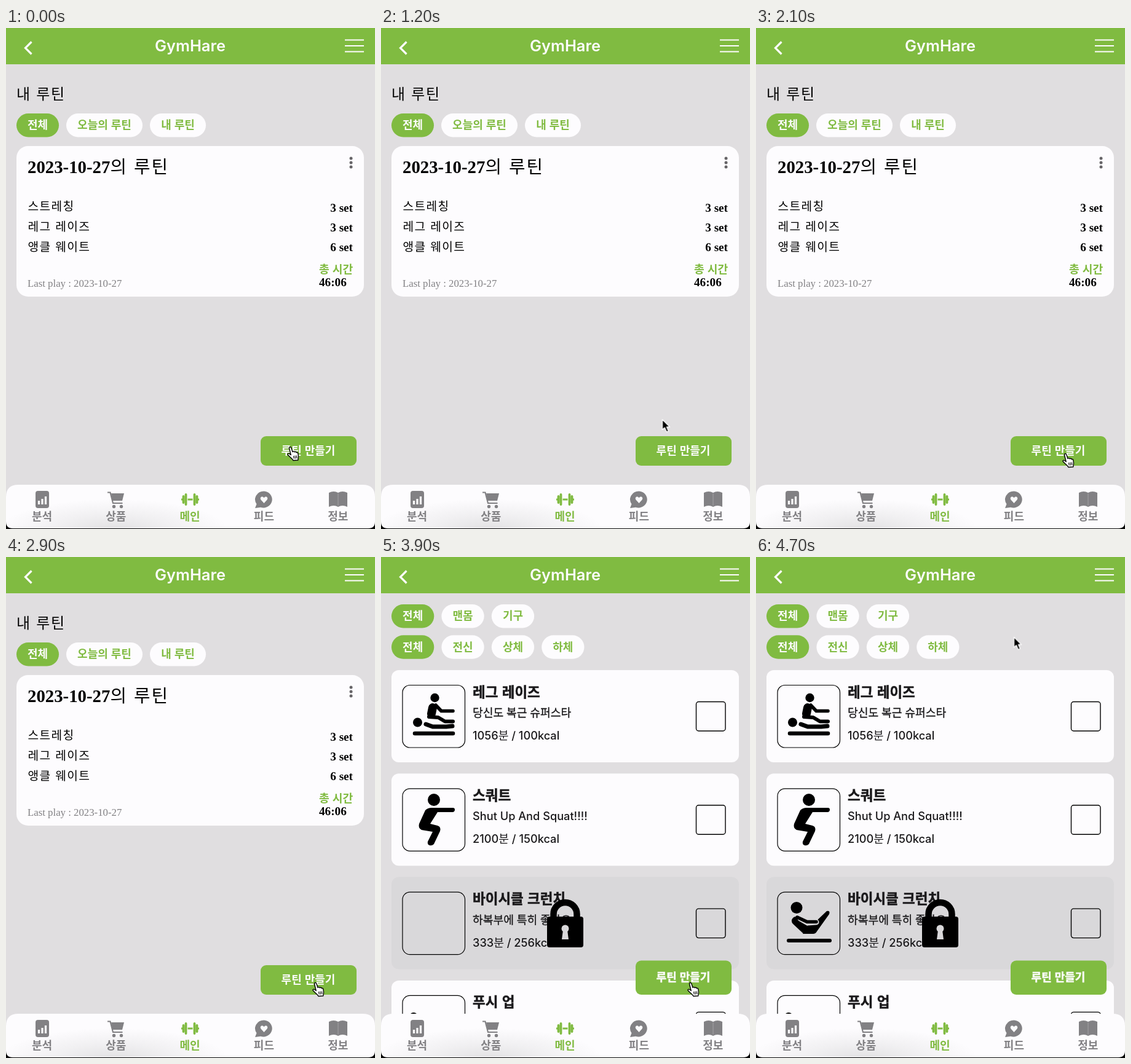
These frames come from a looping animation (600 by 815 pixels, 5000 ms). An HTML page:

```html
<!DOCTYPE html>
<html lang="ko">
<head>
<meta charset="utf-8">
<title>GymHare</title>
<style>
  :root { --green: #80bb41; --white: #fdfcfe; --gray: #828184; }
  html, body { margin: 0; width: 100%; height: 100%; overflow: hidden; background: #e0dee0; }
  svg { display: block; width: 100vw; height: 100vh; }
  text { font: 500 18.2px Inter, 'Noto Sans CJK KR', 'Noto Sans CJK', sans-serif; fill: #1a191b; }
  .kr { font: 700 18px 'Noto Sans CJK KR', 'Noto Sans CJK', sans-serif; }
  .serif { font: 400 19.2px 'Liberation Serif', 'Noto Sans CJK KR', 'Noto Sans CJK', serif; fill: #000; }
  .han { font-family: 'Noto Sans CJK KR', 'Noto Sans CJK', serif; font-weight: 300; letter-spacing: .07em; }
  .bold { font-weight: 700; }
  .mid { text-anchor: middle; }
  .end { text-anchor: end; }
  .green { fill: var(--green); }
  .white { fill: var(--white); }
  .gray { fill: var(--gray); }
  .line { fill: none; stroke: #000; stroke-linecap: round; stroke-linejoin: round; }
  .heavy { stroke: #1a191b; stroke-width: .5; }
  .medium { stroke: #1a191b; stroke-width: .3; }

  #home, #picker, #thumb, #cursor, #hand, #arrow { animation: 5s step-end infinite; }
  #home { animation-name: leave; }
  #picker { animation-name: enter; }
  #thumb { animation-name: load; }
  #cursor { animation-name: move; }
  #hand { animation-name: hand; }
  #arrow { animation-name: arrow; }
  @keyframes leave { 0% { visibility: visible } 78%, 100% { visibility: hidden } }
  @keyframes enter { 0% { visibility: hidden } 78%, 100% { visibility: visible } }
  @keyframes load { 0% { opacity: 0 } 80%, 100% { opacity: 1 } }
  @keyframes hand { 0% { opacity: 1 } 8% { opacity: 0 } 30% { opacity: 1 } 84%, 100% { opacity: 0 } }
  @keyframes arrow { 0% { opacity: 0 } 8% { opacity: 1 } 30% { opacity: 0 } 84%, 100% { opacity: 1 } }
  @keyframes move {
    0%  { transform: translate(462px, 682px) }
    6%  { transform: translate(461px, 668px) }
    8%  { transform: translate(459px, 648px) }
    10% { transform: translate(458px, 640px) }
    12% { transform: translate(457.5px, 637px) }
    28% { transform: translate(466px, 648px) }
    30% { transform: translate(484px, 671px) }
    32% { transform: translate(498px, 687px) }
    34% { transform: translate(503px, 693px) }
    84% { transform: translate(478px, 622px) }
    86% { transform: translate(437px, 501px) }
    92% { transform: translate(357px, 305px) }
    94%, 100% { transform: translate(419.5px, 130.5px) }
  }
</style>
</head>
<body>
<svg viewBox="0 0 600 815" preserveAspectRatio="none">
  <defs>
    <radialGradient id="shade">
      <stop offset="0" stop-color="#777" stop-opacity=".2"/>
      <stop offset=".5" stop-color="#777" stop-opacity=".09"/>
      <stop offset="1" stop-color="#777" stop-opacity="0"/>
    </radialGradient>
    <clipPath id="bar"><path d="M0 763Q0 743 20 743H580Q600 743 600 763V803Q600 814 589 814H11Q0 814 0 803Z"/></clipPath>
  </defs>
  <rect width="600" height="815" fill="#e0dee0"/>

  <g id="home">
    <text class="serif" x="17" y="116"><tspan class="han" style="font-size:24px">내 루틴</tspan></text>
    <g id="filters"></g>
    <rect class="white" x="17" y="192" width="565" height="245" rx="19"/>
    <text class="serif bold" x="35" y="235.5" style="font-size:28.8px">2023-10-27<tspan class="han" style="font-weight:400">의 루틴</tspan></text>
    <g fill="#666467">
      <circle cx="561" cy="212" r="2.5"/><circle cx="561" cy="219" r="2.5"/><circle cx="561" cy="226" r="2.5"/>
    </g>
    <g id="sets"></g>
    <text class="kr green" x="509" y="399" style="font-size:18.2px">총 시간</text>
    <text class="serif bold" x="509" y="420">46:06</text>
    <text class="serif" x="35" y="421" style="font-size:16.8px;fill:#828184">Last play : 2023-10-27</text>
    <rect class="green" x="414" y="664" width="156" height="48" rx="9"/>
    <text class="kr mid white" x="491.5" y="693.5">루틴 만들기</text>
  </g>

  <g id="picker">
    <g id="chips"></g>
    <g id="cards"></g>
    <g>
      <circle cx="87.5" cy="229" r="7.2"/>
      <circle cx="59.5" cy="269" r="7.5"/>
      <g class="line">
        <path d="M84 245L82 255" stroke-width="14"/>
        <path d="M89 241L98 250.500H117" stroke-width="5.5"/>
        <path d="M78 260L93 261L104 267.500H117" stroke-width="6"/>
        <path d="M73 272L84 276H106L116 275" stroke-width="7"/>
        <path d="M55 287H117" stroke-width="6.5"/>
      </g>
    </g>
    <g>
      <circle cx="86" cy="395" r="10"/>
      <path d="M72 412Q76 408 82 408H117Q120 408 120 411T117 415H92L80 434L92 437Q98 439 96 446L86 467Q83 470 79 469T76 463L84 447L66 444Q60 441 62 434Z"/>
    </g>
    <g id="thumb">
      <circle cx="66" cy="570.5" r="9.5"/>
      <path d="M76 613H93Q97 613 99 609L119 581Q121 575 115 576L94 596L84 599Z"/>
      <g class="line">
        <path d="M65 592L80 606" stroke-width="14"/>
        <path d="M72 588L84 595L98 594" stroke-width="9" style="stroke:#d9d8da"/>
        <path d="M67 586L83 593.500H98" stroke-width="5.500"/>
        <path d="M53 624H120" stroke-width="6"/>
      </g>
    </g>
    <circle cx="53" cy="748" r="7"/>
    <path d="M280.500 588V581A19 19 0 0 1 318.500 581V588" fill="none" stroke="#000" stroke-width="10.500"/>
    <rect x="270" y="585" width="59" height="50" rx="4"/>
    <path d="M296 607L294 622H305L303 607Z" fill="#d9d8da"/>
    <circle cx="299.500" cy="604.500" r="6" fill="#d9d8da"/>
    <rect class="green" x="414" y="656.500" width="156" height="55.500" rx="9"/>
    <text class="kr mid white" x="491.5" y="690" stroke="#fdfcfe" stroke-width=".5">루틴 만들기</text>
  </g>

  <rect class="green" width="600" height="59"/>
  <text class="mid" x="299.500" y="38" style="font-size:25.4px;font-weight:600;fill:#fdfcfe">GymHare</text>
  <path d="M41.500 22.500L31.500 32.500L41.500 42.500" fill="none" stroke="#fdfcfe" stroke-width="3.200"/>
  <path d="M551 19.500H582M551 29H582M551 38.500H582" fill="none" stroke="#fdfcfe" stroke-width="2"/>

  <path d="M0 800H600V815H0Z" fill="#080808"/>
  <g clip-path="url(#bar)">
    <rect class="white" y="743" width="600" height="71"/>
    <ellipse cx="175" cy="816" rx="185" ry="50" fill="url(#shade)"/>
  </g>
  <g class="gray">
    <rect x="48" y="753" width="22" height="28" rx="4"/>
    <path d="M53.500 775V769M59 775V766M64.500 775V762" stroke="#fdfcfe" stroke-width="3.200"/>
    <path d="M171 757H192L189 769H173Z"/>
    <path d="M165 755.500H169.500L174 773H189.500" fill="none" stroke="#828184" stroke-width="2.200"/>
    <circle cx="175.500" cy="778.500" r="2.700"/><circle cx="187.500" cy="778.500" r="2.700"/>
    <path d="M419.500 753.500A14.300 13.500 0 1 1 414 779.800L405 781L407.500 774.500A14.300 13.500 0 0 1 419.500 753.500Z"/>
    <path class="white" d="M419.500 773L414.500 767.500C411.800 763.500 417 760.500 419.500 764.500C422 760.500 427.200 763.500 424.500 767.500Z"/>
    <path d="M525 756Q533 752 540 756Q547 752 555 756V779Q547 775 540 779Q533 775 525 779Z"/>
    <path d="M540 757V777" stroke="#a3a2a5" stroke-width="1"/>
  </g>
  <path d="M292.500 759V775M306.500 759V775M288.500 762V772M310.500 762V772" stroke="#80bb41" stroke-width="3.800" stroke-linecap="round"/>
  <path d="M285 767H288M295.500 767H303.500M311 767H314" stroke="#80bb41" stroke-width="3"/>
  <g id="tabs"></g>

  <g id="cursor">
    <g id="hand" stroke="#000" stroke-width="1.400" stroke-linejoin="round">
      <path fill="#fff" d="M-1.500 1.500C-1.800-.8 1-1.200 1.800 1L4 7.500C4.800 6.200 6.600 6.400 7 7.800C8 6.800 9.600 7.200 10 8.600C11 8 12.500 8.500 12.800 10L13.500 14.500C13.600 17 12.800 18 12.800 21L5 21.500C4 19-1 15.500-3.500 12.500C-4.800 10.800-3 9.500-1.500 10.500L1.200 12.500Z"/>
      <path fill="none" stroke-width="1.100" d="M5.500 14L6.200 18.500M8 13.500L8.500 18.500M10.500 13.500L10.800 18"/>
    </g>
    <path id="arrow" d="M0 0V16.500L3.800 13.100L6.900 20L9.900 18.700L7 12H12Z" fill="#000" stroke="#fff" stroke-width="1.300" stroke-linejoin="round"/>
  </g>
</svg>
<script>
  const put = (id, html) => document.getElementById(id).innerHTML = html;
  const text = (x, y, cls, s, style = '') => `<text x="${x}" y="${y}" class="${cls}" style="${style}">${s}</text>`;

  const pill = (x, y, w, label, on) =>
    `<rect x="${x}" y="${y}" width="${w}" height="38.5" rx="19.25" class="${on ? 'green' : 'white'}"/>` +
    text(x + w / 2, y + 25.3, 'kr mid ' + (on ? 'white' : 'green'), label);

  const chipRow = (y, labels) => labels.map((s, i) => pill(17 + i * 81.4, y, 69.3, s, !i)).join('');

  const card = ([title, note, info], i) => {
    const y = 184 + i * 168.3;
    const fill = i === 2 ? '#d9d8da' : '#fdfcfe';
    return `<rect x="17" y="${y}" width="565" height="150" rx="12" fill="${fill}"/>` +
      `<rect x="35" y="${y + 24.5}" width="101.5" height="101.5" rx="12" class="line" stroke-width="1.2"/>` +
      `<rect x="512.5" y="${y + 51.5}" width="47.5" height="47.5" rx="4" class="line" stroke-width="1.4"/>` +
      text(149, y + 43.5, 'kr heavy', title, 'font-size:22.5px') +
      text(149, y + 76, /[가-힣]/.test(note) ? 'medium' : '', note) +
      text(149, y + 113, '', info);
  };

  put('filters', pill(17, 139, 69, '전체', true) + pill(98, 139, 124, '오늘의 루틴') + pill(234, 139, 91, '내 루틴'));
  put('sets', [['스트레칭', 3], ['레그 레이즈', 3], ['앵클 웨이트', 6]].map(([name, n], i) =>
    text(35.5, 297 + i * 33, 'serif han', name, 'font-size:19.2px') +
    text(564, 299 + i * 32, 'serif bold end', n + ' set')).join(''));
  put('chips', chipRow(77, ['전체', '맨몸', '기구']) + chipRow(127.3, ['전체', '전신', '상체', '하체']));
  put('cards', [
    ['레그 레이즈', '당신도 복근 슈퍼스타', '1056분 / 100kcal'],
    ['스쿼트', 'Shut Up And Squat!!!!', '2100분 / 150kcal'],
    ['바이시클 크런치', '하복부에 특히 좋아요', '333분 / 256kcal'],
    ['푸시 업', '', '']
  ].map(card).join(''));
  put('tabs', ['분석', '상품', '메인', '피드', '정보'].map((s, i) =>
    text(58.5 + i * 120.3, 800.7, 'kr mid ' + (i === 2 ? 'green' : 'gray'), s)).join(''));
</script>
</body>
</html>
```
